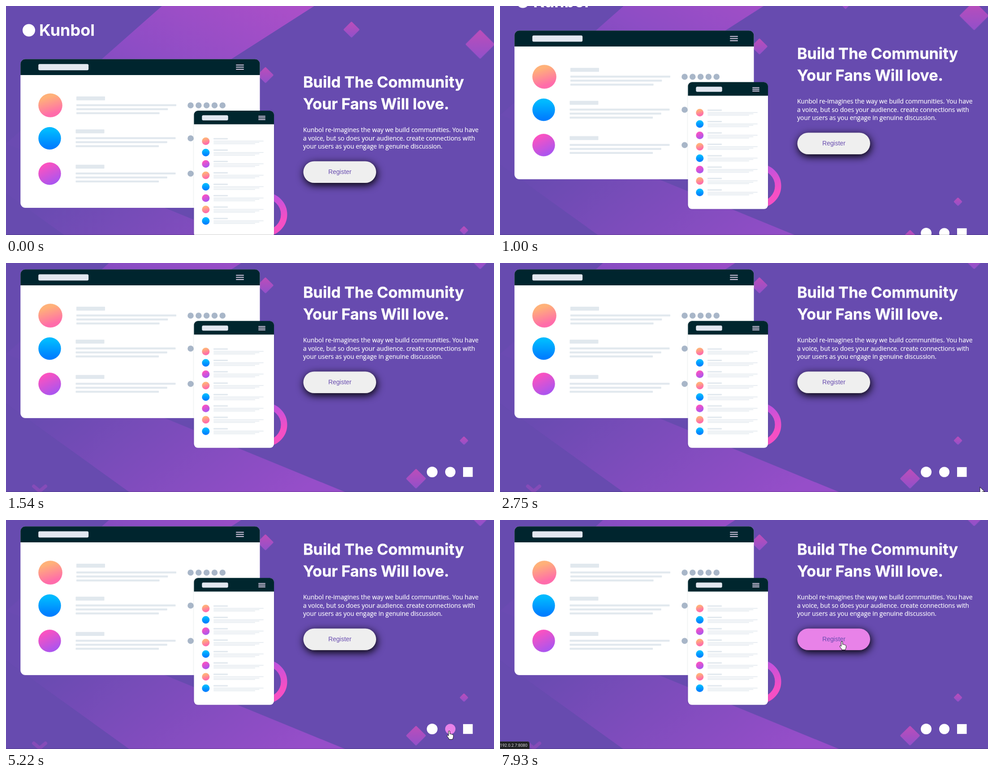
Write an HTML page that moves like this. It is 1089 px wide and 514 px high and loops after 8000 ms.

```html
<!DOCTYPE html>
<html lang="en">
<head>
<meta charset="utf-8">
<title>Community landing page</title>
<style>
  html, body { margin: 0; width: 100%; height: 100%; overflow: hidden; background: #674baf; }
  svg { display: block; width: 100%; height: 100%; }
  .title { font: 700 34.2px Inter, sans-serif; fill: #fff; stroke: #fff; stroke-width: .4; }
  .brand { font: 700 36px Inter, sans-serif; fill: #fff; }
  .copy { font: 13.9px "Open Sans", sans-serif; fill: #fff; stroke: #fff; stroke-width: .2; }
  .label { font: 13.9px "Liberation Sans", sans-serif; fill: #674baf; text-anchor: middle; }
  .status { font: 9.2px Roboto, sans-serif; fill: #dcdcdf; }
  .icon { fill: #fff; }
  #button { fill: #efefef; }
  .pointer { fill: #fff; stroke: #111; stroke-width: 1; stroke-linejoin: round; }
</style>
</head>
<body>
<svg viewBox="0 0 1089 514" preserveAspectRatio="none">
  <defs>
    <linearGradient id="upper" gradientUnits="userSpaceOnUse" x1="150" y1="320" x2="407" y2="-137">
      <stop stop-color="#6b4bb2"/><stop offset=".5" stop-color="#8d4dc5"/><stop offset="1" stop-color="#ab4fc8"/>
    </linearGradient>
    <linearGradient id="lower" gradientUnits="userSpaceOnUse" x1="130" y1="400" x2="430" y2="790">
      <stop stop-color="#694bb1"/><stop offset="1" stop-color="#964ec9"/>
    </linearGradient>
    <linearGradient id="diamond" x2="1" y2="1">
      <stop stop-color="#bd4db9"/><stop offset="1" stop-color="#9150ca"/>
    </linearGradient>
    <linearGradient id="ring" x1=".4" y1="0" x2=".7" y2="1">
      <stop stop-color="#b953e2"/><stop offset=".75" stop-color="#f64fc4"/>
    </linearGradient>
    <linearGradient id="orange" x1=".35" y1="0" x2=".65" y2="1">
      <stop offset=".15" stop-color="#ffb179"/><stop offset=".85" stop-color="#ff6cab"/>
    </linearGradient>
    <linearGradient id="blue" x2="0" y2="1">
      <stop offset=".15" stop-color="#00b9ff"/><stop offset=".9" stop-color="#007eff"/>
    </linearGradient>
    <linearGradient id="pink" x1=".25" y1="0" x2=".75" y2="1">
      <stop offset=".1" stop-color="#fb52c1"/><stop offset=".9" stop-color="#ac55ef"/>
    </linearGradient>
    <filter id="soft" x="-30%" y="-90%" width="160%" height="280%"><feGaussianBlur stdDeviation="9"/></filter>
    <filter id="faint"><feDropShadow dx="0" dy="0" stdDeviation="1.5" flood-color="#00303c" flood-opacity=".22"/></filter>
  </defs>

  <rect width="1089" height="514" fill="#674baf"/>
  <g id="page">
    <path d="M348 0H688L129 360-60 362Z" fill="url(#upper)"/>
    <path d="M129 360 757 619H275L0 420V309Z" fill="url(#lower)"/>
    <path d="M62 606 75 617 88 606" fill="none" stroke="#854cb8" stroke-width="8" stroke-linecap="round"/>
    <g id="diamonds"></g>
    <circle cx="578.5" cy="467.8" r="42" fill="none" stroke="url(#ring)" stroke-width="14"/>
    <g id="windows"></g>

    <circle cx="51" cy="54.5" r="14" fill="#fff"/>
    <text class="brand" x="74" y="67">Kunbol</text>

    <text class="title" x="663" y="183">Build The Community</text>
    <text class="title" x="663" y="232">Your Fans Will love.</text>
    <text class="copy" x="663" y="283">Kunbol re-imagines the way we build communities. You have</text>
    <text class="copy" x="663" y="301.5">a voice, but so does your audience. create connections with</text>
    <text class="copy" x="663" y="320">your users as you engage in genuine discussion.</text>

    <rect x="665" y="353" width="163" height="49" rx="24.5" filter="url(#soft)"/>
    <rect id="button" x="663.5" y="348.5" width="162.5" height="48.5" rx="24.25"/>
    <text class="label" x="745" y="377">Register</text>

    <circle class="icon" id="first" cx="951" cy="574" r="12"/>
    <circle class="icon" id="second" cx="991.5" cy="574" r="11.5"/>
    <rect class="icon" id="third" x="1020" y="563" width="21.5" height="22"/>
  </g>

  <rect y="512.5" width="1089" height="1.5" opacity=".13"/>
  <g id="status">
    <path d="M0 497.5H62Q65.5 497.5 65.5 501V514H0Z" fill="#202124" stroke="#3a3a40"/>
    <text class="status" x="0" y="509">192.0.2.7:8080</text>
  </g>
  <g id="cursor">
    <path class="pointer" id="arrow" d="M0 0V14.5L3.3 11.4 5.5 16.4 7.7 15.4 5.5 10.6H10.5Z"/>
    <path class="pointer" id="hand" d="M-1.6 2a1.6 1.6 0 0 1 3.2 0v5.5c1-.9 2.6-.5 3 .6 1-.6 2.4-.2 2.7.9 1-.4 2 .3 2 1.6v3.4c0 1.6-1.5 2.5-1.5 5.5h-8c0-2.5-2.5-4-4.6-7.6-.8-1.4 1.2-2.6 2.3-1.4l.9 1z"/>
  </g>
</svg>

<script>
const LOOP = 8000;
const $ = id => document.getElementById(id);
const repeat = (n, draw) => Array.from({ length: n }, (_, i) => draw(i)).join('');

// Drawing helpers
const bar = (x, y, w, h, fill = '#e1e8ee', r = 1) =>
  `<rect x="${x}" y="${y}" width="${w}" height="${h}" rx="${r}" fill="${fill}"/>`;
const dot = (x, y, r, fill) => `<circle cx="${x}" cy="${y}" r="${r}" fill="${fill}"/>`;
const lines = (x, y, w, h, gap, shrink) => repeat(3, k => bar(x, y + gap * k, w - shrink * k, h));
const menu = (x, y, w, gap) => repeat(3, k => bar(x, y + gap * (k - 1) - 1, w, 2, '#e0d0ea'));
const pill = (x, y, w, h) => bar(x, y, w, h, '#e2e7f0', 3);
const paint = i => `url(#${['orange', 'blue', 'pink'][i % 3]})`;

function panel(x, y, w, h, r, head) {
  return bar(x, y, w, h, '#fff', r) +
    `<path d="M${x} ${y + head}V${y + r}a${r} ${r} 0 0 1 ${r} ${-r}h${w - 2 * r}a${r} ${r} 0 0 1 ${r} ${r}v${head - r}z" fill="#00252e"/>`;
}

function desktopRow(y, i) {
  const x = i ? 155.5 : 157;
  return dot(x - 58, y, i ? 25.2 : 26.8, paint(i)) + bar(x, y - 20, 64, 8.7) +
    lines(x, y - 2.4, 223, 4.2, 9, 18.7) +
    repeat(i ? 1 : 5, k => dot(412 + 17.8 * k, y, 6.8, '#a8b6c8'));
}

function phoneRow(i) {
  const y = 303.4 + 25.57 * i;
  return dot(445.8, y, 8.5, paint(i)) + bar(463, y - 7, 32, 3) + lines(463, y - 1, 112, 1.5, 3.1, 9.4);
}

$('windows').innerHTML =
  panel(32.3, 119.2, 534.2, 333.8, 11, 35.8) + pill(72.2, 130.2, 112, 14) + menu(513, 137.3, 18, 4.7) +
  [223, 297, 376.2].map(desktopRow).join('') +
  `<g filter="url(#faint)">${panel(419.5, 235, 178.5, 284.8, 9, 30.5)}${pill(437.3, 245.3, 58.4, 11.5)}` +
  `${menu(563, 251.2, 16, 3.8)}${repeat(8, phoneRow)}</g>`;

// Each diamond: centre and half diagonal
$('diamonds').innerHTML = [[771, 53, 18.5], [1058, 86, 33], [579, 155, 18.5], [1022, 503.5, 10], [915, 589, 22.5]]
  .map(([x, y, half]) => {
    const side = half * Math.SQRT2;
    return `<rect x="${-side / 2}" y="${-side / 2}" width="${side}" height="${side}" rx="2"
      fill="url(#diamond)" transform="translate(${x} ${y}) rotate(45)"/>`;
  }).join('');

// Motion: each track is a list of [ms, value]
function track(el, prop, steps, easing = 'linear') {
  const full = [[0, steps[0][1]], ...steps, [LOOP, steps[steps.length - 1][1]]];
  el.animate(full.map(([ms, value]) => ({ offset: ms / LOOP, [prop]: value, easing })),
    { duration: LOOP, iterations: Infinity });
}
const move = (x, y) => `translate(${x}px, ${y}px)`;

// The page scrolls in even ticks along an ease-out curve
const SCROLL = { start: 520, first: 590, end: 1540, ticks: 15, distance: 104.9 };
const scrollTicks = Array.from({ length: SCROLL.ticks }, (_, i) => {
  const ms = SCROLL.first + (SCROLL.end - SCROLL.first) * i / (SCROLL.ticks - 1);
  const left = (SCROLL.end - ms) / (SCROLL.end - SCROLL.start);
  return [ms, move(0, -SCROLL.distance * (1 - left ** 1.5))];
});
track($('page'), 'transform', [[0, move(0, 0)], ...scrollTicks], 'step-end');

// Stops of the pointer: it travels from `leave` to `arrive`, then rests
const stops = [
  { leave: 2400, arrive: 3250, x: 1026.5, y: 471, id: 'third' },
  { leave: 3900, arrive: 4680, x: 989, y: 473, id: 'second' },
  { leave: 5200, arrive: 5970, x: 949, y: 471, id: 'first' },
  { leave: 6330, arrive: 6580, x: 865, y: 380 },
  { leave: 6920, arrive: 7670, x: 763, y: 272, id: 'button' }
];
const HOVER = '#e882e8', FADE = 300;
const path = [];
const overLink = [[0, 0]];
let at = move(1095, 520);

stops.forEach(({ leave, arrive, x, y, id }, i) => {
  path.push([leave, at], [arrive, at = move(x, y)]);
  if (!id) return;
  const base = getComputedStyle($(id)).fill;
  const enter = arrive - FADE;
  const colours = [[enter, base], [arrive, HOVER]];
  overLink.push([enter, 1]);
  if (stops[i + 1]) {
    const exit = stops[i + 1].leave + 60;
    colours.push([exit, HOVER], [exit + FADE, base]);
    overLink.push([exit + 60, 0]);
  }
  track($(id), 'fill', colours);
});
track($('cursor'), 'transform', path, 'ease-in-out');
track($('hand'), 'opacity', overLink, 'step-end');
track($('arrow'), 'opacity', overLink.map(([ms, on]) => [ms, 1 - on]), 'step-end');

track($('status'), 'opacity', [[7730, 0], [7930, 1]]);
</script>
</body>
</html>
```
